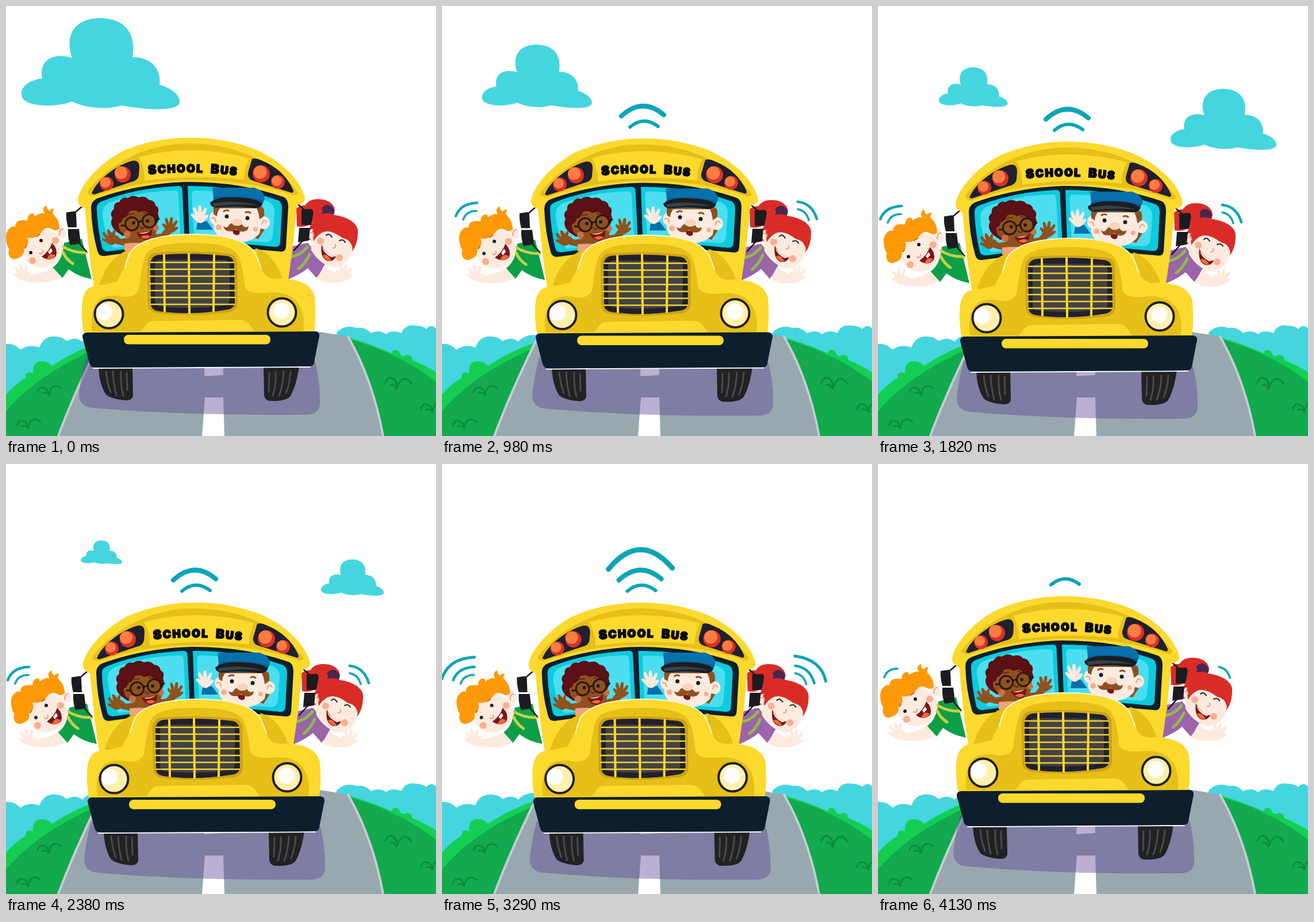
An HTML page that plays this animation: 748x748 px, repeating every 4.2 s.

```html
<!DOCTYPE html>
<html lang="en">
<head>
<meta charset="utf-8">
<title>School bus</title>
<style>
html, body { margin: 0; height: 100%; overflow: hidden; background: #fff; }
svg { display: block; width: 100%; height: 100%; }
.line { fill: none; stroke-linecap: round; stroke-linejoin: round; }
.sun { fill: #fcd92d; }
.gold { fill: #e7bf19; }
.navy { fill: #0d1f2d; }
.skin { fill: #fdeadf; }
.blush { fill: #f8ae92; }
.mouth { fill: #7d1418; }
.tongue { fill: #f2683c; }
.brown { fill: #8d4f20; }
.ink { fill: #1c1c20; }
</style>
</head>
<body>
<svg viewBox="0 0 748 748">
  <defs>
    <path id="cloud" fill="#45d5de" d="M27 154C26 139 43 128 63 126C57 99 77 79 115 90C104 62 110 22 163 21C217 22 225 58 220 89C252 88 271 111 267 137C285 142 303 154 302 167C301 182 257 183 200 173C178 181 138 178 115 166C88 177 28 177 27 154Z"/>
    <path id="tuft" class="line" stroke="#0b8b3e" stroke-width="2.5" d="M-20 4Q-18 -6 -9 -4Q-1 -1 0 9Q2 -8 12 -7Q18 -6 21 -2M-11 5Q-4 3 0 9"/>
    <path id="hand" d="M-7 12C-11 7 -18 3 -16 0C-14 -3 -10 1 -8 2C-11 -5 -15 -11 -11 -13C-8 -14 -5 -6 -3 -2C-3 -9 -4 -16 0 -16C4 -16 3 -8 4 -2C7 -8 9 -13 12 -11C15 -9 10 -2 9 3C12 1 16 0 16 3C15 8 9 12 6 15Q0 19 -7 12Z"/>
    <clipPath id="glass"><path d="M157 352Q157 344 166 340C210 322 260 314 300 313L480 313V430H160Z"/></clipPath>
  </defs>

  <!-- landscape -->
  <path fill="#45d5de" d="M0 588Q14 586 25 598Q40 587 58 594Q66 573 87 575Q100 576 105 583Q121 574 133 584Q146 568 175 574V748H0ZM575 748V568Q590 553 609 560Q624 557 635 569Q650 562 661 571Q672 562 688 569Q694 553 713 556Q727 557 731 562Q740 552 748 561V748Z"/>
  <path fill="#14ce54" d="M0 676Q15 658 34 647Q33 634 47 639Q46 617 62 618Q73 617 80 626Q120 599 170 583V748H0ZM590 575Q636 588 671 604Q674 594 684 601Q686 609 692 609Q704 603 707 616Q730 625 748 637V748H590Z"/>
  <path fill="#12a94f" d="M0 705Q55 640 160 595V748H0ZM590 578Q685 603 748 654V748H590Z"/>
  <use href="#tuft" x="39" y="726"/><use href="#tuft" x="75" y="668"/>
  <use href="#tuft" transform="translate(682 655)rotate(12)scale(1.08 1.3)"/><use href="#tuft" x="742" y="697"/>
  <path fill="#98a8ae" d="M91 748Q119 672 172 565L180 560H505L595 575Q638 650 656 748Z"/>
  <path class="line" stroke="#c3cdd2" stroke-width="4" d="M91 748Q119 672 172 565M595 575Q638 650 656 748"/>
  <path fill="#fff" d="M347 575H377L378 642L345 644ZM346 681H378L380 748H341Z"/>

  <use href="#cloud" id="near"/>
  <use href="#cloud" id="far"/>

  <g id="bus">
    <path fill="rgb(90 64 146 / .41)" d="M139 610H535Q547 648 546 692Q545 711 520 711Q310 713 152 699Q129 698 127 678Q128 655 139 610Z"/>

    <!-- signal arcs -->
    <g class="line" stroke="#0ba5b7">
      <g class="wave"><path stroke-width="6" d="M297 209Q321 189 346 208"/><path stroke-width="3.5" d="M7 370Q12 355 30 355M589 352Q604 355 608 371"/></g>
      <g class="wave"><path stroke-width="8" d="M282 190Q319 156 356 188"/><path stroke-width="4.5" d="M-6 364Q2 342 31 341M589 339Q614 342 622 369"/></g>
      <g class="wave"><path stroke-width="9" d="M264 171Q319 104 375 169"/><path stroke-width="5" d="M-26 362Q-14 326 31 324M588 322Q634 328 642 366"/></g>
    </g>

    <!-- boy leaning out -->
    <path fill="#0d9f47" d="M101 412L132 405L149 475Q126 471 109 458L98 473L81 455Q98 444 101 412Z"/>
    <path class="line" stroke="#c9cf45" stroke-width="5" d="M98 418Q117 430 140 429M99 428Q104 440 116 448"/>
    <g class="skin">
      <path d="M81 454L97 472Q66 487 28 477L31 467Q60 469 81 454Z"/>
      <use href="#hand" transform="translate(28 463)rotate(-12)scale(.92)"/>
      <ellipse cx="96" cy="393" rx="8" ry="11" transform="rotate(-25 96 393)"/>
      <ellipse cx="64" cy="422" rx="35" ry="32" transform="rotate(-30 64 422)"/>
    </g>
    <path class="line" stroke="#ed9f85" stroke-width="2" d="M93 398Q93 388 99 388"/>
    <path fill="#ff9907" d="M16 440Q6 442 4 428Q7 422 3 419Q-4 399 4 389Q10 382 16 384Q16 370 37 373Q38 360 48 361L50 366Q61 358 67 361Q61 350 71 347Q70 354 76 356Q79 351 84 353Q79 359 83 363Q93 372 93 387Q87 393 80 388Q70 382 62 393Q52 406 37 403Q42 415 31 421Q34 436 16 440Z"/>
    <circle class="blush" cx="86" cy="408" r="6"/><circle class="blush" cx="46" cy="443" r="6"/>
    <path class="mouth" d="M62 436Q76 426 80 412Q91 423 87 435Q76 446 62 436Z"/>
    <path class="tongue" d="M71 440Q77 427 86 434Q80 442 71 440Z"/>
    <path fill="#fff" d="M73 428L78 421L81 426L76 432Z"/>
    <circle class="ink" cx="61" cy="408" r="3"/><circle class="ink" cx="43" cy="429" r="3"/>
    <path class="line" stroke="#e9a183" stroke-width="2" d="M58 430Q64 433 64 425"/>
    <path class="line" stroke="#c46b16" stroke-width="2" d="M53 401L59 397M33 421L36 417"/>

    <!-- girl leaning out -->
    <path fill="#d92c27" d="M505 352Q513 346 520 347Q528 335 543 336Q561 336 569 347Q575 356 569 363Q607 369 612 389Q613 413 602 427Q595 411 582 405L555 392L537 409L525 406Q524 389 533 377Q520 387 506 383Z"/>
    <path fill="#492653" d="M549 352Q558 341 568 350Q573 356 570 363Q560 358 549 362Q553 357 549 352Z"/>
    <path fill="#9b64ab" d="M490 420L525 412L555 449L541 474L525 456Q512 467 490 476Z"/>
    <path class="line" stroke="#90bd43" stroke-width="5" d="M497 436Q512 434 524 419M509 457Q521 448 528 432"/>
    <g class="skin">
      <path d="M555 454Q573 467 590 467L592 477Q568 487 539 474Z"/>
      <use href="#hand" transform="translate(589 463)rotate(14)scale(.92)"/>
      <path d="M529 392Q540 384 547 392Q565 386 584 399Q601 402 603 421Q597 453 571 455Q547 451 531 425Z"/>
      <ellipse cx="532" cy="397" rx="7" ry="9"/>
    </g>
    <path fill="#d92c27" d="M533 390Q552 380 572 383Q608 380 608 414Q605 416 603 422Q600 406 586 404Q564 387 550 394Q542 398 535 409Z"/>
    <path class="line" stroke="#2b2024" stroke-width="2" d="M557 399Q562 394 567 402M580 408Q587 405 590 411"/>
    <path class="line" stroke="#eba286" stroke-width="2" d="M573 415Q575 421 569 421M530 395Q536 392 535 400"/>
    <circle class="blush" cx="547" cy="409" r="6"/><circle class="blush" cx="580" cy="438" r="6"/>
    <path class="mouth" d="M549 415Q557 433 574 436Q569 446 558 443Q546 437 549 415Z"/>
    <path class="tongue" d="M551 434Q559 429 566 443Q556 444 551 434Z"/>
    <path fill="#fff" d="M550 419Q558 432 572 436L566 437Q552 430 550 419Z"/>

    <!-- mirrors -->
    <path class="line" stroke="#17191e" stroke-width="2.5" d="M138 344L111 367M118 402L140 427M508 345L529 363M501 425L520 404"/>
    <g class="ink">
      <path d="M105 359L119 357Q122 358 122 362L123 385H108Q104 371 105 359ZM108 388H127L130 413L112 416Q107 403 108 388ZM514 354L532 353Q536 356 534 363L531 381H514ZM510 386H529L527 408L508 411Z"/>
    </g>

    <!-- wheels -->
    <path fill="#222224" d="M161 627H220L221 678Q220 685 210 686Q184 684 174 676Q162 658 161 627ZM448 627H510Q505 661 495 678Q489 688 459 687Q449 685 449 676Z"/>
    <path class="line" stroke="#4a4a4c" stroke-width="3" d="M174 636Q176 656 182 672M186 636Q187 658 192 677M200 636Q199 660 204 678M210 638L211 668M458 638L457 671M469 637Q470 660 464 678M483 636Q482 660 475 678M495 636Q494 655 487 674"/>

    <!-- body -->
    <path class="sun" d="M125 338C127 311 170 266 209 250Q261 229 320 229Q382 229 435 250C484 272 514 306 520 335Q520 344 506 346L499 420L491 476Q530 479 537 506Q540 540 536 568H135Q129 531 134 507Q139 490 153 487L146 440L137 352Q125 348 125 338Z"/>
    <path class="gold" d="M141 324C174 280 237 239 320 239C409 240 475 278 509 326Q503 333 491 326Q415 302 320 303Q227 304 153 331Q143 331 141 324Z"/>
    <path class="sun" d="M231 263Q323 238 423 265Q413 284 414 302Q326 292 241 304Q242 284 231 263Z"/>
    <path fill="#20202f" d="M149 326C158 303 192 276 221 269Q232 268 232 281L231 295Q229 304 218 306L153 328ZM428 266Q435 264 443 268Q484 284 500 321Q500 327 494 324L430 304Q420 301 421 290Z"/>
    <g fill="#d93129"><circle cx="203" cy="293" r="14"/><circle cx="175" cy="309" r="12"/><circle cx="444" cy="292" r="15"/><circle cx="473" cy="306" r="12"/></g>
    <g fill="#ff7d40"><circle cx="200" cy="290" r="11"/><circle cx="173" cy="307" r="9"/><circle cx="442" cy="289" r="11.5"/><circle cx="471" cy="304" r="9"/></g>
    <path id="sign" fill="none" d="M248 293Q325 284 420 297"/>
    <text font-family="Inter, 'DejaVu Sans', sans-serif" font-weight="900" font-size="19" letter-spacing="2.2" fill="#080808" stroke="#080808" stroke-width="2" stroke-linejoin="round"><textPath href="#sign"><tspan font-size="21.5">S</tspan>CHOOL<tspan dx="12" font-size="21.5">B</tspan>US</textPath></text>

    <!-- windscreen -->
    <path class="navy" d="M148 351Q148 340 158 335C211 315 276 306 320 306Q406 306 482 332Q491 335 491 350L487 419Q486 429 476 427L322 414L170 435Q161 435 159 426Q149 390 148 351Z"/>
    <path fill="#0ccbdd" d="M158 353Q157 344 166 340Q223 317 300 313Q306 313 307 320L311 410L177 427Q169 427 167 420Q159 385 158 353ZM316 313Q404 313 473 338Q480 341 480 352L477 412Q476 420 467 419L319 405Z"/>
    <path fill="#4bdef0" d="M168 366Q166 347 182 341Q238 321 295 321Q300 322 300 329L304 410L187 421Q175 410 168 366ZM323 328Q323 320 332 321Q404 323 455 340Q467 345 467 358L464 400Q462 411 452 411L327 402Z"/>

    <g clip-path="url(#glass)">
      <!-- boy with glasses -->
      <path fill="#5b1115" d="M190 391Q179 379 185 369Q179 360 188 353Q186 342 197 341Q202 331 212 334Q221 327 231 333Q242 329 248 337Q259 338 260 347Q268 351 264 361Q269 371 261 380L203 400Z"/>
      <g fill="#8f521e">
        <path d="M192 414L176 403L181 392L200 405L270 396L286 376L293 384L277 410L235 424Z"/>
        <use href="#hand" transform="translate(181 402)rotate(-15)scale(.87)"/>
        <use href="#hand" transform="translate(286 381)rotate(10)scale(.87)"/>
        <path d="M196 378Q202 377 203 370Q213 366 215 357Q226 353 231 359Q244 353 250 364Q259 365 263 380Q264 401 248 409Q223 417 207 398Q195 392 196 378Z"/>
      </g>
      <path fill="#f3a17e" d="M206 413Q228 411 246 413V426H206Z"/>
      <circle cx="211" cy="397" r="6" fill="#c96f45"/><circle cx="261" cy="386" r="5" fill="#c96f45"/>
      <path class="line" stroke="#2c1715" stroke-width="3" d="M201 382H207M231 376Q235 373 238 374M260 373L266 370"/>
      <circle cx="219" cy="379" r="11.5" class="line" stroke="#2c1715" stroke-width="3"/><circle cx="249" cy="374" r="11.5" class="line" stroke="#2c1715" stroke-width="3"/>
      <circle cx="222" cy="377" r="3" class="ink"/><circle cx="246" cy="374" r="3" class="ink"/>
      <path class="line" stroke="#5e2d16" stroke-width="2" d="M233 384Q239 391 241 382M214 363L223 361M239 360L246 361"/>
      <path class="mouth" d="M227 394Q243 396 254 389Q255 405 242 407Q231 405 227 394Z"/>
      <path fill="#fff" d="M231 395Q243 395 251 391Q242 398 231 395Z"/>
      <path class="tongue" d="M234 402Q243 396 251 401Q244 408 234 402Z"/>

      <!-- driver -->
      <path fill="#0870aa" d="M333 377L349 374L360 389H331ZM361 335L359 316H432Q451 323 450 335L444 350H360Z"/>
      <path fill="#07609a" d="M362 333Q404 326 448 338L446 346L358 343Z"/>
      <use href="#hand" class="skin" transform="translate(337 362)scale(.95)"/>
      <path class="brown" d="M361 350H447Q452 363 446 375L449 390L439 405L370 385Z"/>
      <g class="skin">
        <circle cx="448" cy="377" r="11"/><ellipse cx="363" cy="369" rx="9" ry="11"/>
        <path d="M365 352H440Q447 374 441 396Q424 415 390 411Q361 402 361 382Z"/>
      </g>
      <path class="brown" d="M361 351H373Q367 358 367 366L361 362ZM436 352H448Q451 360 447 367L441 371Q440 360 436 352Z"/>
      <path class="line" stroke="#ee9f87" stroke-width="2" d="M445 379Q449 369 454 376M358 369Q364 366 365 375"/>
      <path class="ink" d="M355 342Q368 331 402 333Q437 334 446 344Q442 354 427 351Q396 347 366 351Q355 349 355 342Z"/>
      <path fill="#394047" d="M360 343Q398 336 440 347Q400 343 361 349Z"/>
      <circle cx="384" cy="366" r="3.5" class="ink"/><circle cx="420" cy="369" r="3.5" class="ink"/>
      <path class="line" stroke="#8d4f20" stroke-width="3" d="M379 357Q383 354 387 356M417 359Q422 357 425 360"/>
      <path class="mouth" d="M394 389L407 390L406 397Q401 401 395 395Z"/>
      <path class="brown" d="M400 378Q390 375 386 384Q381 387 378 382Q379 392 390 392Q397 392 400 388Q406 394 415 392Q422 390 422 383Q416 387 412 382Q408 375 400 378Z"/>
      <ellipse cx="402" cy="376" rx="10" ry="6.5" fill="#fbd2be"/>
      <circle class="blush" cx="370" cy="385" r="5"/><circle class="blush" cx="434" cy="388" r="4"/>
    </g>
    <path class="navy" d="M306 309H315L319 407H311Z"/>

    <!-- hood -->
    <path class="gold" d="M162 487Q173 446 204 428L224 420L210 475ZM434 421Q467 432 481 474L446 477Z"/>
    <path class="sun" stroke="#fff6d2" stroke-width="2" d="M201 488Q205 454 215 430Q235 399 320 397Q408 397 430 426Q443 445 450 484Z"/>
    <path class="sun" d="M139 496Q154 481 190 486L205 456H444Q450 475 470 475Q516 473 529 493L536 565H135Z"/>
    <path class="gold" d="M232 488Q236 449 244 431Q257 412 321 412Q386 412 401 430Q412 447 415 486Q418 501 451 499Q500 493 514 528Q520 546 517 566H150Q145 526 163 510Q181 500 205 506Q229 507 232 488Z"/>
    <path class="sun" d="M234 567L245 553Q249 548 259 548L405 546Q418 545 425 556L432 566Z"/>
    <path fill="#cba316" d="M246 448Q247 430 262 429Q324 424 389 431Q401 433 402 447L403 517Q402 531 386 533Q320 541 263 534Q248 532 247 519Z"/>
    <path fill="#20202f" d="M251 449Q252 435 265 433Q324 428 385 435Q396 437 397 450L398 516Q397 526 386 528Q323 539 266 531Q252 529 252 518Z"/>
    <path fill="#434345" d="M259 448Q260 442 270 441L379 442Q388 443 389 451V511Q389 520 378 521Q323 528 270 523Q259 522 259 512Z"/>
    <path class="line" stroke="#f5d32f" stroke-width="2.5" d="M252 446H396M251 458H397M250 470H397M250 483H397M250 495H398M251 507H398M252 519H397"/>
    <path class="line" stroke="#fcd92d" stroke-width="4" stroke-linecap="butt" d="M275 433L276 531M318 431L319 534M362 433L361 531"/>
    <g fill="#fff0ad" stroke="#202026" stroke-width="4"><circle cx="179" cy="536" r="24.5"/><circle cx="480" cy="533" r="24.5"/></g>
    <circle cx="171" cy="532" r="14" fill="#fff"/><circle cx="479" cy="530" r="14" fill="#fff"/>

    <!-- bumper -->
    <path class="line" stroke="#fff" stroke-width="2" d="M152 630L529 628"/>
    <path class="navy" d="M133 576Q133 568 141 568L537 566Q546 567 545 574L536 620Q535 627 527 627L155 629Q147 629 145 621Z"/>
    <rect class="sun" x="205" y="572" width="255" height="16.5" rx="8"/>
  </g>
</svg>
<script>
const LOOP = 4200, STEP = 70, PULSE = 660;
const $ = id => document.getElementById(id);
const waves = [...document.querySelectorAll('.wave')];
const waveStart = [140, 300, 570];

// [time, value] pairs for the sway and the bounce of the bus
const sway = [[0, 0], [980, 30], [1050, 30.5], [1820, 10], [2100, 1], [2380, 9], [3010, 26], [3150, 29], [3640, 17], [4130, 4], [LOOP, 1]];
const bounce = [[0, 0], [980, 1.5], [1820, 7], [2380, 12], [2700, 14.3], [2940, 15], [3150, 13.8], [3640, 7.5], [4130, 1], [LOOP, 0]];

function along(keys, t) {
  const i = keys.findIndex(k => k[0] > t);
  const [t0, a] = keys[i - 1], [t1, b] = keys[i];
  return a + (b - a) * (t - t0) / (t1 - t0);
}

// Shrinks a cloud from its pivot towards a point on the horizon
function shrink(cloud, scale, x, y, px, py) {
  cloud.setAttribute('transform', `translate(${x} ${y}) scale(${Math.max(0, scale)}) translate(${-px} ${-py})`);
}

function draw(now) {
  const t = Math.floor(now % LOOP / STEP) * STEP;
  $('bus').setAttribute('transform', `translate(${along(sway, t)} ${along(bounce, t)})`);
  shrink($('near'), 1 - t / 3216, 166.6, 172.4, 166.6, 172.4);
  shrink($('far'), t < 1150 ? 0 : (3198 - t) / 2059, 605.2, 198, 170.8, 101.6);
  waves.forEach((w, i) => w.setAttribute('visibility', t % PULSE >= waveStart[i] ? 'visible' : 'hidden'));
}

const start = performance.now();
function tick() {
  draw(performance.now() - start);
  requestAnimationFrame(tick);
}
tick();
</script>
</body>
</html>
```
